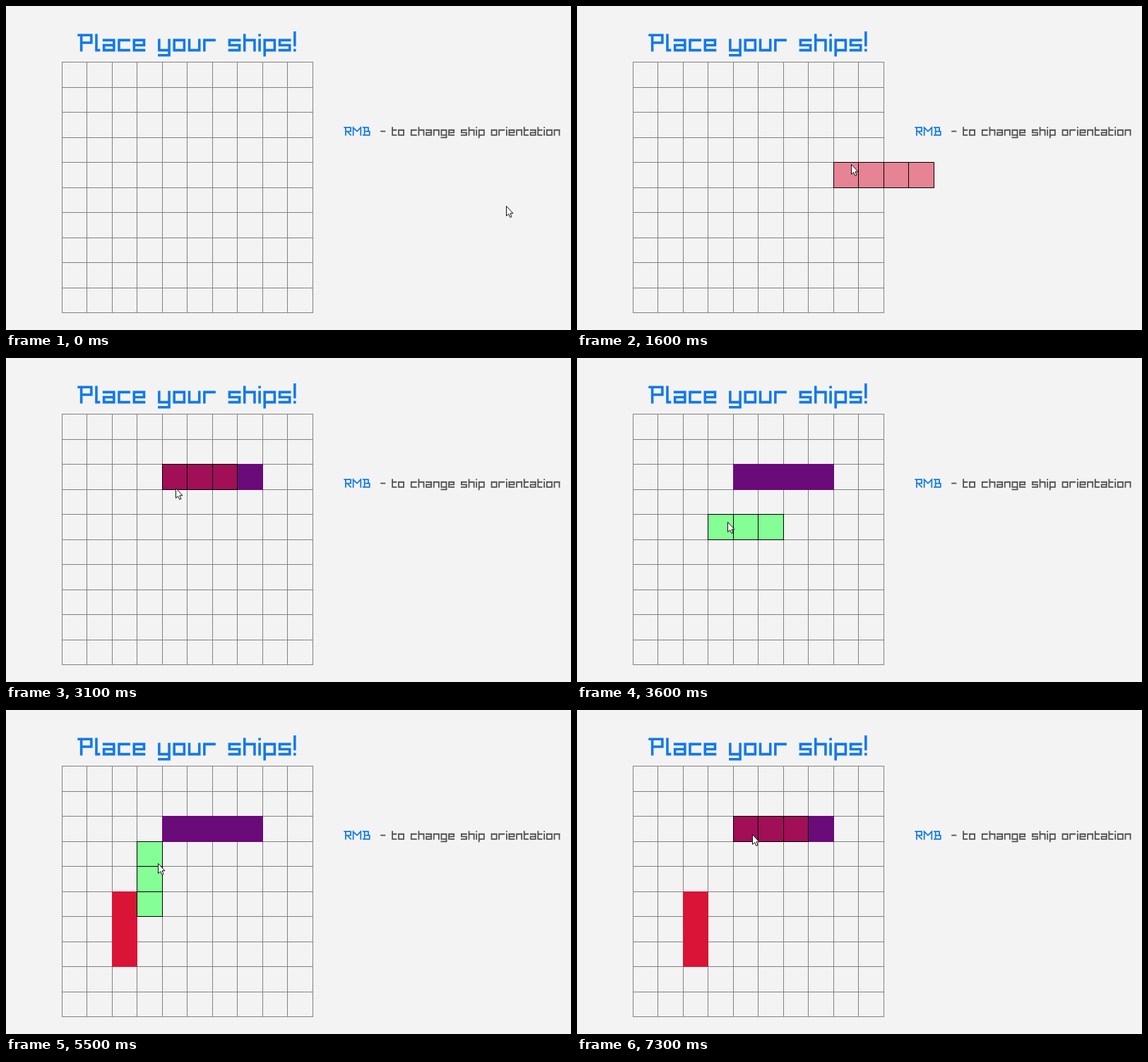
An HTML page with a canvas for the animation above (8000 ms loop, 800x459 px).

```html
<!DOCTYPE html>
<html lang="en">
<head>
<meta charset="utf-8">
<title>Place your ships!</title>
<style>
html, body { margin: 0; width: 800px; height: 459px; overflow: hidden; background: #f3f3f3; }
canvas { display: block; }
</style>
</head>
<body>
<canvas id="stage" width="800" height="459" role="img"
  aria-label="Place your ships! RMB - to change ship orientation"></canvas>
<script>
const ctx = document.getElementById('stage').getContext('2d');
const LOOP = 8000, STEP = 100, CELLS = 10, PITCH = 35.5;
const RED = '#d91436', PURPLE = '#690b78', BLUE = '#1279e8', GRAY = '#505050';
const lineX = i => Math.round(78.9 + PITCH * i);
const lineY = i => Math.round(79.2 + PITCH * i);

// Blocky stroke font: [advance width, path], caps are rows 0-6, descenders reach row 8
const GLYPHS = {
  ' ': [3, ''],
  '!': [1, 'M0 -1V4M0 6v.01'],
  '-': [4, 'M0 3H3'],
  P: [6, 'M0 0H5V3H1M1 0V6'],
  R: [6, 'M0 0H5V3H1M1 0V6M3 4L5 6'],
  M: [7, 'M0 6V0L3 3L6 0V6'],
  B: [6, 'M0 0H4V3M1 0V6M0 6H5V3H1'],
  a: [5, 'M0 2H4V6H0V4H4'],
  c: [5, 'M4 2H0V6H4'],
  e: [5, 'M4 6H0V2H4V4H0'],
  g: [5, 'M4 6H0V2H4V8H0'],
  h: [5, 'M0 0V6M0 2H4V6'],
  i: [1, 'M0 0v.01M0 2V6'],
  l: [2, 'M0 0V6H1'],
  n: [5, 'M0 6V2H4V6'],
  o: [5, 'M0 2H4V6H0Z'],
  p: [5, 'M0 8V2H4V6H0'],
  r: [5, 'M0 6V2H4'],
  s: [5, 'M4 2H0V4H4V6H0'],
  t: [4, 'M0 0V6H3M0 2H3'],
  u: [5, 'M0 2V6H4V2'],
  y: [5, 'M0 2V6H4M4 2V8H0'],
};

function write(text, x, y, unit, color) {
  ctx.save();
  ctx.translate(x, y);
  ctx.scale(unit, unit);
  ctx.translate(.5, .5);
  ctx.strokeStyle = color;
  ctx.lineCap = 'square';
  for (const char of text) {
    const [width, path] = GLYPHS[char];
    ctx.stroke(new Path2D(path));
    ctx.translate(width + 1, 0);
  }
  ctx.restore();
}

// Pointer path: time, x, y
const PATH = [
  [0, 708, 283], [100, 708, 283], [300, 707, 283], [900, 707, 283], [1300, 570, 256],
  [1600, 388, 224], [1800, 372, 208], [2200, 273, 176], [2500, 248, 170], [2950, 248, 170],
  [3600, 213, 232], [3800, 207, 250], [4000, 178, 270], [5050, 178, 270],
  [5900, 248, 170], [6100, 248, 170], [6800, 248, 176], [LOOP, 248, 176],
];

function pointerAt(t) {
  const n = PATH.findIndex(p => p[0] > t);
  const [t0, x0, y0] = PATH[n - 1], [t1, x1, y1] = PATH[n];
  const k = (t - t0) / (t1 - t0);
  return [x0 + (x1 - x0) * k, y0 + (y1 - y0) * k];
}

const cellsOf = ship => Array.from({ length: ship.size }, (_, i) =>
  ship.upright ? [ship.col, ship.row + i] : [ship.col + i, ship.row]);

const FLEET = [
  { at: 3000, col: 4, row: 2, size: 4, upright: false, color: PURPLE },
  { at: 5100, col: 2, row: 5, size: 3, upright: true, color: RED },
];

function cellRect([col, row]) {
  const x = lineX(col), y = lineY(row);
  return [x, y, lineX(col + 1) - x, lineY(row + 1) - y];
}

function drawGrid() {
  ctx.strokeStyle = '#828282';
  ctx.beginPath();
  for (let i = 0; i <= CELLS; i++) {
    ctx.moveTo(lineX(i) + .5, lineY(0));
    ctx.lineTo(lineX(i) + .5, lineY(CELLS) + 1);
    ctx.moveTo(lineX(0), lineY(i) + .5);
    ctx.lineTo(lineX(CELLS) + 1, lineY(i) + .5);
  }
  ctx.stroke();
}

function drawPlaced(ship) {
  ctx.fillStyle = ship.color;
  for (const cell of cellsOf(ship)) {
    const [x, y, w, h] = cellRect(cell);
    ctx.fillRect(x, y, w + 1, h + 1);
  }
}

function drawPreview(ship, placed) {
  const cells = cellsOf(ship);
  const taken = new Set(placed.flatMap(cellsOf).map(String));
  const valid = cells.every(c => Math.max(...c) < CELLS && !taken.has(String(c)));
  ctx.strokeStyle = '#000';
  for (const cell of cells) {
    const [x, y, w, h] = cellRect(cell);
    ctx.globalAlpha = valid ? 1 : .5;
    ctx.fillStyle = valid ? '#86fe96' : RED;
    ctx.fillRect(x, y, w, h);
    ctx.globalAlpha = 1;
    ctx.strokeRect(x + .5, y + .5, w, h);
  }
}

const ARROW = new Path2D('M.5 .5V14.5L3.6 11.6L5.8 16.5L8 15.5L5.9 10.8H10Z');

function drawPointer(x, y) {
  ctx.save();
  ctx.translate(Math.round(x), Math.round(y));
  ctx.fillStyle = '#fff';
  ctx.strokeStyle = '#111';
  ctx.fill(ARROW);
  ctx.stroke(ARROW);
  ctx.restore();
}

function draw(now) {
  const t = Math.floor(now % LOOP / STEP) * STEP;
  const [x, y] = pointerAt(t);
  const col = Math.floor((x - lineX(0)) / PITCH);
  const row = Math.floor((y - lineY(0)) / PITCH);
  const placed = FLEET.filter(ship => t >= ship.at);

  ctx.fillStyle = '#f3f3f3';
  ctx.fillRect(0, 0, 800, 459);
  write('Place your ships!', 101.3, 39.5, 32 / 9, BLUE);
  write('RMB', 478.3, 171.3, 16 / 9, BLUE);
  write('- to change ship orientation', 530.2, 171.3, 16 / 9, GRAY);
  drawGrid();
  placed.forEach(drawPlaced);
  if (col < CELLS) {
    const upright = t >= 4200 && t < 6900;
    drawPreview({ col, row, size: placed.length ? 3 : 4, upright }, placed);
  }
  drawPointer(x, y);
}

const start = performance.now();
function tick() {
  draw(performance.now() - start);
  requestAnimationFrame(tick);
}
tick();
</script>
</body>
</html>
```
